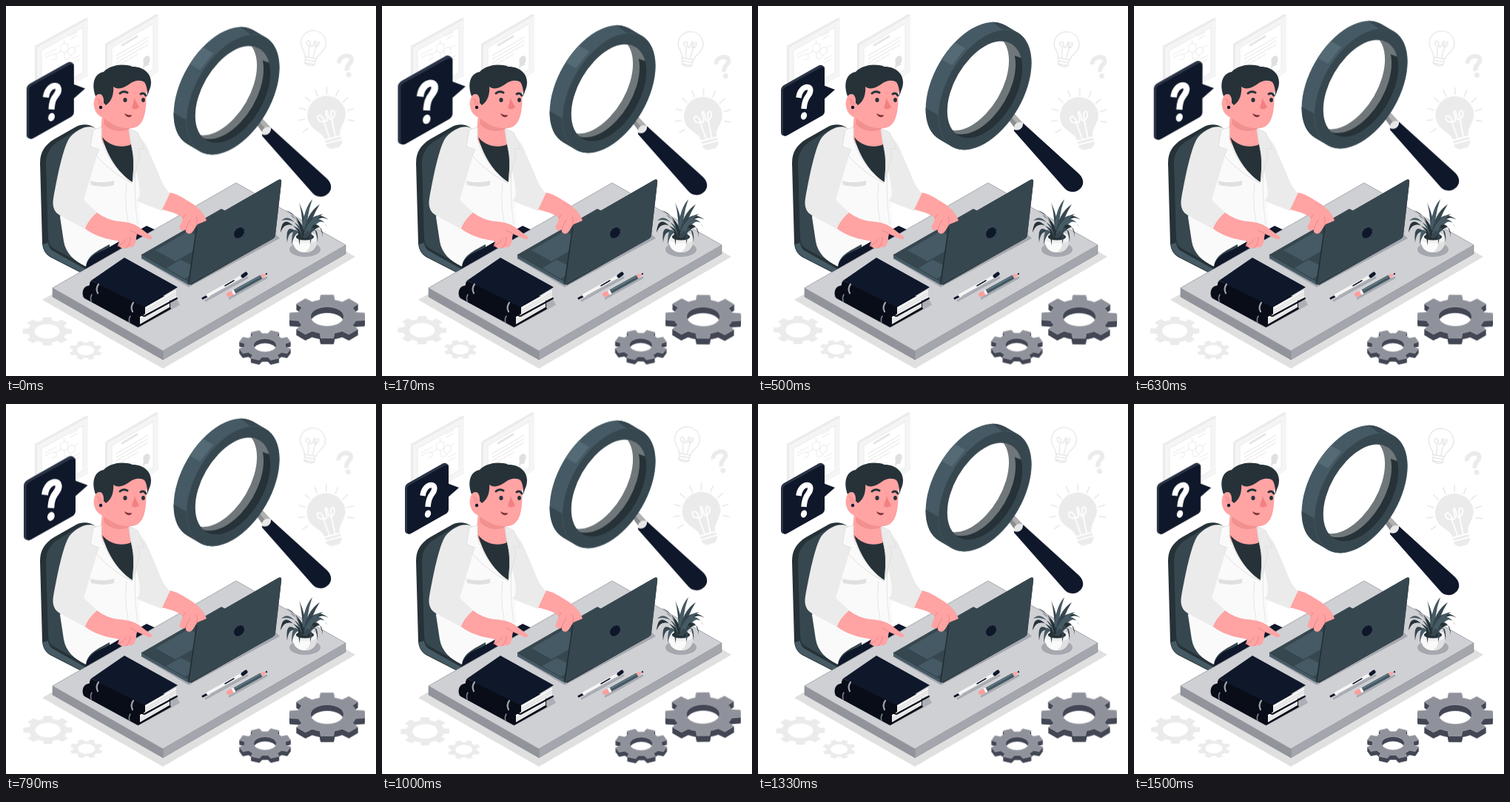
An HTML page that plays this animation: 500x500 px, repeating every 1.54 s.

```html
<!DOCTYPE html>
<html lang="en">
<head>
<meta charset="utf-8">
<title>Research desk</title>
<style>
html, body { margin: 0; width: 100%; height: 100%; overflow: hidden; background: #fff; }
svg { display: block; width: 100vw; height: 100vh; }
.line { fill: none; stroke-linecap: round; stroke-linejoin: round; }
.flat { stroke-linecap: butt; }
</style>
</head>
<body>
<svg viewBox="0 0 500 500">
  <defs>
    <clipPath id="hole"><ellipse cx="306.5" cy="120" rx="71.5" ry="41.5" transform="rotate(-60 306.5 120)"/></clipPath>
    <clipPath id="rim"><path id="rimShape"/></clipPath>
  </defs>

  <g id="wall">
    <path fill="#ebebeb" d="M39 54 108 16 111 17V94L43 132 39 130Z"/>
    <path fill="#f5f5f5" d="M42 56 111 18V94L42 132Z"/>
    <path fill="#fff" stroke="#ebebeb" d="M48 60 104 29V90L48 122Z"/>
    <g class="line" stroke="#ebebeb">
      <path d="M53 66 68 58M53 70 63 65M86 41 97 35M87 45 96 40M90 72 99 67M90 77 99 72"/>
      <path d="M74 54l5-4 5 2v7l-5 4-5-2zM84 59l5-4 4 2v6l-5 4-4-2zM79 63v7l4 2 5-4M74 61l-6 4M79 50l-1-4M93 57l5-4M64 66l4-1v6l-5 2"/>
    </g>
    <path fill="#ebebeb" d="M134 51 203 11 206 12V89L138 129 134 127Z"/>
    <path fill="#f5f5f5" d="M137 53 206 13V89L137 129Z"/>
    <path fill="#fff" stroke="#ebebeb" d="M143 56 199 24V86L143 118Z"/>
    <g class="line" stroke="#e6e6e6">
      <path stroke-width="3" d="M157 53 177 41"/>
      <path d="M149 67 192 42M149 72 192 47M149 77 192 52M149 82 178 65M150 90 170 79"/>
    </g>
    <ellipse cx="190" cy="73" rx="4.5" ry="6" fill="#e0e0e0" transform="rotate(20 190 73)"/>
    <path fill="#e0e0e0" d="M186 76l-1 8 4-3 4-1v-6z"/>
  </g>

  <g id="back"></g>

  <g id="chair">
    <path fill="#263238" d="M122 166C113 159 103 159 95 163L65 180C52 188 46 198 46 212L49 321C50 331 54 336 61 340L104 362 140 340 130 180Z"/>
    <path fill="#37474f" d="M122 167C113 161 106 162 99 166L72 182C60 189 54 199 54 213L57 314C58 323 61 326 67 329L108 352 140 340V180Z"/>
    <path fill="#455a64" d="M50 322C51 331 55 335 61 339L104 361 108 356 67 333C61 330 58 327 57 320Z"/>
  </g>

  <g id="body">
    <path fill="#0f172a" d="M107 362C107 341 119 335 134 329L190 297 205 304 190 325Z"/>
    <path fill="#fafafa" d="M118 167 128 163 169 169C181 173 187 180 190 190L206 225C211 240 217 249 223 254L211 277 181 266C180 276 180 284 183 295L140 322C122 332 110 337 108 352 92 344 81 335 78 318L73 285 90 200Z"/>
    <path fill="#ebebeb" d="M121 165C109 160 96 167 86 178 77 191 69 232 64 260 62 272 66 279 73 283L108 302C111 292 116 285 123 279L105 262 120 212 126 190Z"/>
    <path fill="#ebebeb" d="M180 178C190 185 193 196 198 208L207 229C211 241 217 249 223 254L211 277 176 263C186 256 178 235 174 212Z"/>
    <path class="line" stroke="#e6e6e6" d="M176 205C174 235 173 262 178 295M163 240C160 262 163 290 168 302"/>
    <path fill="#ffa3a3" d="M130 148 127 178C132 190 145 198 158 199L170 190 168 160Z"/>
    <path fill="#263238" d="M130 177C139 189 157 193 169 187L173 205 171 238C156 229 138 208 130 177Z"/>
    <path fill="#fafafa" stroke="#e0e0e0" d="M129 164 118 167 114 190 126 194 122 202C138 220 155 232 170 239 153 226 137 207 129 180Z"/>
    <path fill="#ebebeb" stroke="#e0e0e0" d="M166 165 178 171 187 193 178 193 181 202 171 239C174 216 173 200 168 181Z"/>
    <path fill="#e0e0e0" d="M114 236C124 239 135 239 146 236V242C135 245 124 244 115 242Z"/>
  </g>

  <g id="head">
    <path fill="#ffa3a3" d="M131 112C136 92 184 92 192 108L190 116C189 124 190 128 189 135 188 151 183 164 170 165 154 165 143 161 133 151 123 150 117 138 119 128 121 119 126 117 131 121Z"/>
    <path fill="#f28f8f" d="M133 152C143 161 155 166 168 165 158 172 141 170 132 159Z"/>
    <path fill="#263238" d="M121 122C115 106 119 91 132 89 140 80 158 77 171 82 187 82 196 92 196 103 196 111 193 114 191 122 191 113 190 107 187 103 181 99 172 101 166 106 158 112 150 113 145 109 146 120 142 130 135 134L132 131C133 119 126 116 121 122Z"/>
    <path class="line" stroke="#e88585" d="M123 126C127 125 129 129 129 133M126 128C124 131 126 133 128 134"/>
    <circle cx="128" cy="137" r="2.2" fill="#0f172a"/>
    <path class="line" stroke="#263238" stroke-width="3" d="M154 118C157 115 160 115 164 117M182 119C185 117 187 118 189 121"/>
    <ellipse cx="161" cy="127" rx="2.6" ry="3" fill="#263238"/>
    <ellipse cx="185.500" cy="127" rx="2.4" ry="3" fill="#263238"/>
    <path fill="#f28080" d="M174 124C175 130 179 133 180 137 177 140 173 140 170 138Z"/>
    <path fill="#7c3238" d="M160 145C163 147 167 148 170 147 169 152 162 151 160 145Z"/>
  </g>

  <g id="table">
    <path fill="#e0e0e0" d="M49 397 63 389 212 466 459 331 472 339 212 490Z"/>
    <path fill="#92949c" d="M63 381 212 466V478L63 393Z"/>
    <path fill="#a4a6ad" d="M212 466 459 323V335L212 478Z"/>
    <path fill="#cfd0d4" stroke="#8c8e96" stroke-width=".7" d="M63 381 311 239 459 323 212 466Z"/>
    <path fill="none" stroke="#85878f" stroke-width=".6" d="M63 381V393L212 478 459 335V323M212 466V478"/>
  </g>

  <g id="books">
    <path fill="#adafb6" d="M103 393 178 435 235 404 231 396 140 372Z"/>
    <path fill="#080d18" d="M108 379 130 372 222 394V409L178 434 106 395C102 391 103 382 108 379Z"/>
    <path fill="#f5f5f5" d="M181 420 221 397V407L181 430Z"/>
    <path class="line" stroke="#bdbdbd" stroke-width=".7" d="M182 424 221 402M182 427 221 405"/>
    <path class="line" stroke="#080d18" stroke-width="2" d="M179 433 222 409"/>
    <path fill="#080d18" d="M115 371 186 405V420L115 385C112 381 112 375 115 371Z"/>
    <path fill="#f5f5f5" d="M188 407 230 383V393L188 417Z"/>
    <path fill="#0f172a" d="M115 371 160 340 232 380 187 407Z"/>
    <path class="line" stroke="#bdbdbd" stroke-width=".7" d="M189 411 230 387M189 414 230 390"/>
    <path class="line" stroke="#080d18" stroke-width="2" d="M187 419 231 395"/>
    <path class="line" stroke="#9fa3ad" stroke-width="2.200" d="M125 376C122 380 122 384 124 388M172 401C169 405 169 409 171 413"/>
    <path class="line" stroke="#80848f" stroke-width="1.500" d="M116 390C114 393 114 395 115 399M168 419C166 422 166 425 167 428"/>
  </g>

  <g id="laptop">
    <path fill="#a6a8af" d="M182 341 247 380 370 314 362 306Z"/>
    <path fill="#455a64" d="M183 336 247 372V377L183 341Z"/>
    <path fill="#37474f" d="M183 336 291 274 303 280 250 374Z"/>
    <path fill="#455a64" d="M202 330 247 304 259 311 255 330 229 345Z"/>
    <path fill="#455a64" d="M215 355 236 343 252 351 248 364 241 369Z"/>
    <path class="line" stroke="#263238" stroke-width=".7" d="M183 336 247 372"/>
  </g>

  <g id="hands" fill="#ffa3a3">
    <path d="M123 279C132 286 142 290 153 291 167 292 176 295 184 302L196 311C199 314 196 316 193 315L177 308 176 313C176 320 173 327 168 326L162 327C156 329 154 325 151 324L153 318 134 314C124 311 115 307 107 301 110 292 116 285 123 279Z"/>
    <path class="line" stroke="#ee8585" d="M151 324C157 322 160 320 162 315M162 327C166 324 168 319 168 313M177 308 168 303"/>
    <path d="M222 252C231 254 239 259 247 264 259 271 267 279 271 290L259 295C256 297 254 305 250 307 246 309 242 306 243 302 238 305 233 302 235 297L239 287C232 280 222 278 211 275 215 267 218 260 222 252Z"/>
    <path class="line" stroke="#ee8585" d="M243 302C244 297 247 293 249 289M257 297C259 292 259 288 257 285M239 287 242 282"/>
  </g>

  <g id="lid">
    <path fill="#263238" d="M257 299 368 235C371 233 373 235 372 239L364 309C364 312 362 314 360 315L250 377 246 374Z"/>
    <path fill="#37474f" d="M258 298 368 235C371 234 372 236 372 239L364 309C364 312 362 314 360 315L247 377Z"/>
    <path class="line" stroke="#1f2a30" stroke-width=".8" d="M258 299 247 376"/>
    <ellipse cx="315" cy="306.500" rx="8" ry="6" fill="#0f172a" transform="rotate(-48 315 306.500)"/>
  </g>

  <g id="pens" class="line">
    <path stroke="#a9abb2" stroke-width="3" d="M270 398 326 367M302 395 352 367"/>
    <path stroke="#0f172a" stroke-width="3" d="M266 395 272 392"/>
    <path stroke="#f5f5f5" stroke-width="4.500" d="M273 391 318 366"/>
    <path stroke="#9a9ca4" d="M276 392 318 369"/>
    <path stroke="#0f172a" stroke-width="5" d="M320 365 324 362"/>
    <path stroke="#0f172a" stroke-width="1.500" d="M296 378 308 371"/>
    <path stroke="#ff9d9d" stroke-width="6" d="M301 390 305 388"/>
    <path class="flat" stroke="#455a64" stroke-width="6" d="M309 386 345 366"/>
    <path stroke="#78909c" d="M310 384 344 365"/>
    <path class="flat" stroke="#f5f5f5" stroke-width="6" d="M306 387.500 309 386"/>
    <path fill="#ffa3a3" d="M344 363 353 361 347 368Z"/>
    <circle cx="352" cy="362" r="1.200" fill="#263238"/>
  </g>

  <g id="plant">
    <ellipse cx="404" cy="329" rx="21" ry="10" fill="#a6a8af"/>
    <path fill="#fafafa" d="M387 313C387 326 393 333 404 333 415 333 421 326 421 313Z"/>
    <path fill="#e0e0e0" d="M411 320C418 319 421 316 421 313 421 326 415 333 404 333 409 329 411 326 411 320Z"/>
    <ellipse cx="404" cy="313" rx="17" ry="7.500" fill="#f0f0f0"/>
    <ellipse cx="404" cy="312" rx="12" ry="4.500" fill="#263238"/>
  </g>

  <g id="cogs"></g>

  <g id="glass">
    <path fill="#b0b0b0" d="M337 158 346 152 360 167 350 176Z"/>
    <path fill="#8c8e90" d="M337 158 341 155 354 171 350 176Z"/>
    <path fill="#0f172a" d="M346 176C345 168 351 162 359 166L434 234C441 241 441 250 434 255 428 260 419 259 414 253Z"/>
    <path fill="#e8e8e8" d="M346 174C345 167 351 162 358 165 359 171 353 177 346 174Z"/>
    <g id="ring"></g>
  </g>

  <g id="bubble">
    <path fill="#0f172a" d="M88 107 104 113 88 127Z"/>
    <path fill="#2b3446" d="M31 114C31 111 32 109 35 107L81 81C84 79 87 79 90 83L89 144 38 175C33 176 31 174 31 171Z"/>
    <path fill="#0f172a" d="M34 115C34 112 35 111 38 109L85 83C88 82 90 83 90 86V142C90 145 89 146 87 148L41 174C36 177 34 176 34 172Z"/>
    <path class="line flat" stroke="#fff" stroke-width="7.500" d="M55 124C56 115 61 110 66 109.500 72 109 72 116 68 121 64 126 62.500 130 62 139"/>
    <ellipse cx="62" cy="148.500" rx="4" ry="5.200" fill="#fff" transform="rotate(20 62 148.500)"/>
  </g>
</svg>
<script>
const $ = id => document.getElementById(id);
const NS = 'http://www.w3.org/2000/svg';

function add(parent, tag, attrs) {
  const el = document.createElementNS(NS, tag);
  for (const k in attrs) el.setAttribute(k, attrs[k]);
  return parent.appendChild(el);
}

// Toothed outline lying on the floor, with an elliptical hole
function cogPath(cx, cy, r, hole, turn = 0, n = 8) {
  const step = 2 * Math.PI / n, k = .58;
  const pt = (rad, a) => `${(cx + rad * Math.cos(a)).toFixed(1)} ${(cy + k * rad * Math.sin(a)).toFixed(1)}`;
  const pts = [];
  for (let i = 0; i < n; i++) {
    const a = i * step + turn;
    pts.push(pt(r * .78, a - .25), pt(r, a - .17), pt(r, a + .17), pt(r * .78, a + .25), pt(r * .78, a + step / 2));
  }
  return `M${pts.join('L')}ZM${cx - hole} ${cy}a${hole} ${hole * k} 0 1 0 ${2 * hole} 0a${hole} ${hole * k} 0 1 0 ${-2 * hole} 0Z`;
}

function solidCog(cx, cy, r, hole, depth, turn) {
  for (let z = depth; z >= 0; z--) {
    add($('cogs'), 'path', {
      d: cogPath(cx, cy + z, r, hole, turn), 'fill-rule': 'evenodd',
      fill: z ? '#434754' : '#90929b', stroke: z ? '#434754' : '#b4b5bc', 'stroke-width': .6
    });
  }
}

function drawBack() {
  const g = $('back'), pale = '#ebebeb', thin = '#e4e4e4';
  for (const c of [[56, 440, 33.5, 17, 0], [108, 465.5, 22.5, 11.5, Math.PI / 8]])
    add(g, 'path', { d: cogPath(...c), fill: pale, 'fill-rule': 'evenodd' });

  const small = add(g, 'g', { class: 'line', stroke: thin, 'stroke-width': 1.2, transform: 'translate(415 50) rotate(10)' });
  add(small, 'path', { d: 'M-8 20C-8 13-17 9-17 0A17 17 0 0 1 17 0C17 9 8 13 8 20ZM-7 20V28C-5 31 5 31 7 28V20M-7 24H7M-7 28H7' });
  add(small, 'path', { d: 'M-3 19-5 4C-11 4-10-4-6-2-3 0-4 5-2 5 2 5 0-4 2-4 4-4 1 5 4 4 9 3 9-5 6-3 4-2 5 4 4 8L3 19' });

  const big = add(g, 'g', { transform: 'translate(433 147) rotate(-15)' });
  add(big, 'path', { fill: pale, d: 'M-11 31C-11 20-26 15-26 0A26 26 0 0 1 26 0C26 15 11 20 11 31ZM-11 33H11V41L6 46H-6L-11 41Z' });
  add(big, 'path', {
    class: 'line', stroke: '#fff', 'stroke-width': 1.8,
    d: 'M-4 30-6 7C-15 7-14-4-9-2-5 0-6 8-3 8 2 8-2-6 1-6 4-6 0 8 4 7 12 6 14-4 9-4 5-3 6 5 5 12L4 30M-11 37H11'
  });

  for (let i = 0; i < 10; i++) {
    const a = (-212 + i * 24.5) * Math.PI / 180, c = Math.cos(a), s = Math.sin(a);
    add(g, 'path', {
      class: 'line', stroke: thin, 'stroke-width': 1.3,
      d: `M${433 + 29.5 * c} ${149 + 30.5 * s}L${433 + 38 * c} ${149 + 39.5 * s}`
    });
  }

  const ask = add(g, 'g', { transform: 'translate(459 79) rotate(-12)' });
  add(ask, 'path', { class: 'line flat', stroke: pale, 'stroke-width': 6, d: 'M-8-4C-9-13 9-15 9-6 9 0 0-1 0 8' });
  add(ask, 'circle', { cx: 1, cy: 14, r: 3.5, fill: pale });
}

// Each leaf: tip x, tip y, bend x, bend y
function drawLeaves() {
  const leaves = [
    [371, 306, 376, 276], [372, 290, 388, 278], [378, 276, 397, 282], [396, 265, 403, 284],
    [414, 261, 401, 280], [424, 268, 407, 282], [436, 289, 414, 272], [434, 299, 421, 273],
    [428, 312, 424, 280], [380, 320, 378, 288], [386, 323, 388, 290], [421, 320, 419, 284],
    [384, 282, 398, 290], [428, 281, 410, 286], [397, 324, 393, 292], [411, 322, 413, 292]
  ];
  leaves.forEach(([x, y, bx, by], i) => add($('plant'), 'path', {
    fill: i % 3 == 1 ? '#455a64' : i % 2 ? '#37474f' : '#263238',
    d: `M401 313Q${bx - 2} ${by - 2} ${x} ${y}Q${bx + 4} ${by + 6} 407 313Z`
  }));
}

function drawRing() {
  const g = $('ring'), cx = 306.5, cy = 120, dx = -17, dy = -10;
  const oval = (parent, x, y, r, fill, more) => add(parent, 'ellipse', {
    cx: cx + x, cy: cy + y, rx: r, ry: r * .578, fill,
    transform: `rotate(-60 ${cx + x} ${cy + y})`, ...more
  });
  // Silhouette of the rim: two half ovals joined by the depth of the ring
  const hx = 44.5, hy = 77.1;
  $('rimShape').setAttribute('d',
    `M${cx - hx} ${cy + hy}l${dx} ${dy}A89 51.4 -60 0 1 ${cx + hx + dx} ${cy - hy + dy}l${-dx} ${-dy}A89 51.4 -60 0 1 ${cx - hx} ${cy + hy}Z`);
  const side = add(g, 'g', { 'clip-path': 'url(#rim)' });
  add(side, 'path', { fill: '#455a64', d: 'M200 0H400V230H200Z' });
  add(side, 'path', { fill: '#37474f', d: 'M220 141 250 158 320 230H220ZM305 20 345 50 400 60V10Z' });
  add(side, 'path', { fill: '#546a74', d: 'M243 76 262 87 280 64 260 53Z' });
  oval(g, 0, 0, 88.7, '#37474f', { stroke: '#455a64', 'stroke-width': .6 });

  // Inner wall, then the far edge of the lens
  const inner = add(g, 'g', { 'clip-path': 'url(#hole)' });
  add(inner, 'path', { fill: '#263238', d: 'M230 30H380V210H230Z' });
  add(inner, 'path', { fill: '#6f777a', d: 'M300 30H380V86L330 68Z' });
  oval(inner, -9, -5, 71.5, '#6f777a');
  oval(inner, -18, -10, 71.5, '#fff');
}

drawBack();
drawLeaves();
solidCog(434, 419.5, 51, 22.5, 8, 0);
solidCog(350, 458.5, 35.5, 15.5, 6, Math.PI / 8);
drawRing();

function loop(id, origin, steps) {
  const el = $(id);
  el.style.transformOrigin = origin;
  el.animate(steps.map(([offset, transform]) => ({ offset, transform })),
    { duration: 1540, delay: -41, iterations: Infinity });
}

const sway = [[0, 'rotate(0deg)'], [.25, 'rotate(1deg)'], [.75, 'rotate(-1deg)'], [1, 'rotate(0deg)']];
const beat = [[0, 1], [.1, 1.31], [.3, 1], [.4, 1], [.5, 1.31], [.6, 1], [1, 1]].map(([o, s]) => [o, `scale(${s})`]);
const rise = [[0, 'translateY(0px)'], [.5, 'translateY(-10px)'], [1, 'translateY(0px)']];

loop('back', '247px 255px', sway);
loop('cogs', '400px 437px', sway);
loop('bubble', '69px 130px', beat);
loop('glass', '0px 0px', rise);
</script>
</body>
</html>
```
